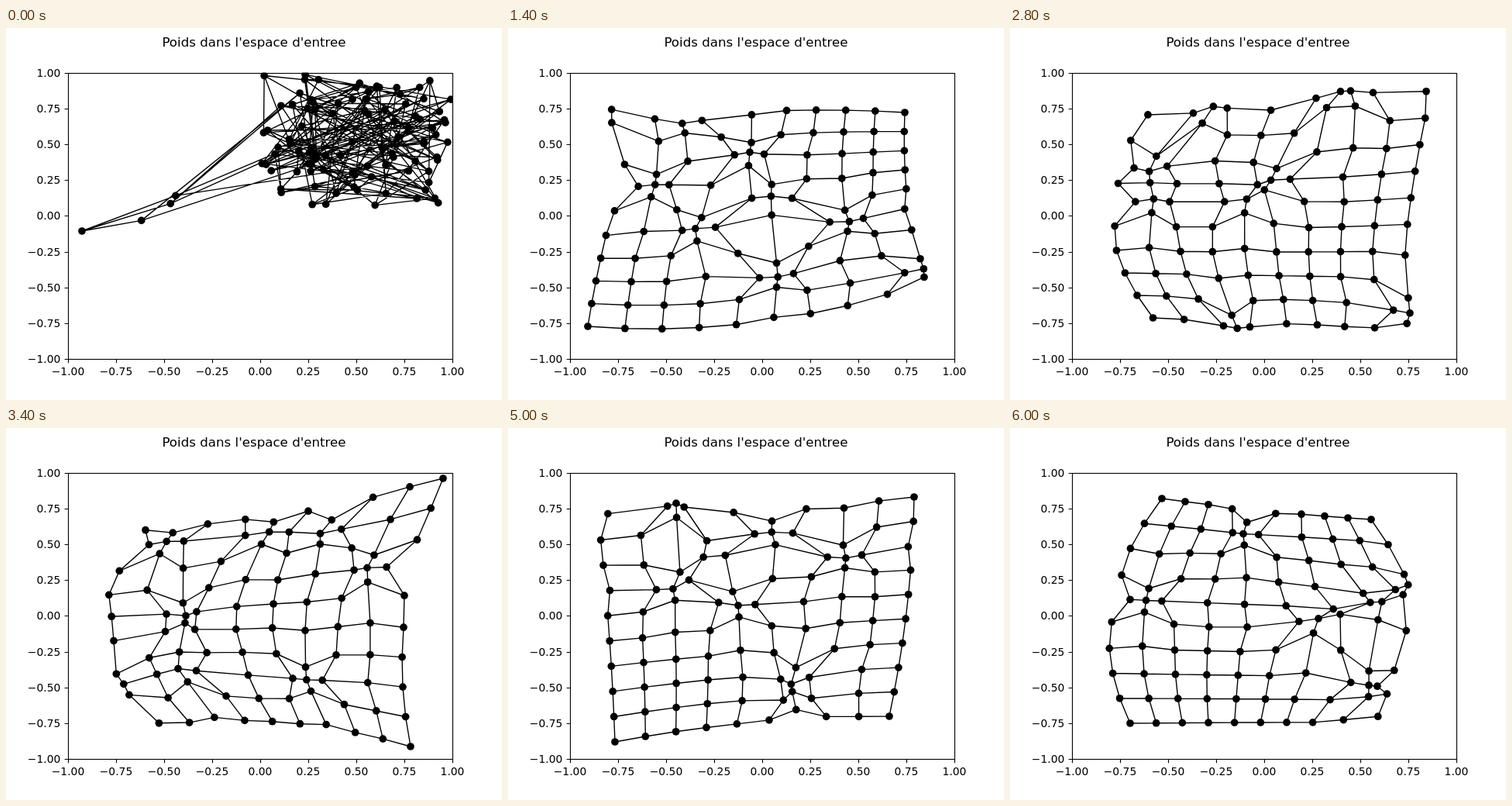
Write an HTML page with a canvas that moves like this. It is 640x480 px and loops after 6.2 s.

```html
<!DOCTYPE html>
<html lang="fr">
<head>
<meta charset="utf-8">
<title>Poids</title>
<style>
html, body { margin: 0; width: 100%; height: 100%; overflow: hidden; background: #fff; }
canvas { display: block; }
</style>
</head>
<body>
<canvas id="stage" width="640" height="480"></canvas>
<script>
const ctx = document.getElementById('stage').getContext('2d');
const N = 10, STEP = 200, STEPS = 31;
const box = { x: 80, y: 57.6, w: 496, h: 369.6 };
const FONT = '"DejaVu Sans", Verdana, sans-serif';

// The middles of the net's sides stay near this frame; its corners wander.
const hull = { left: 130, right: 515, top: 107, bottom: 380 };

// Corners: top left, top right, bottom left, bottom right.
const poses = [
  { t: 1400, corners: [[169, 121], [512, 109], [103, 385], [534, 331]] },
  { t: 2200, corners: [[166, 95], [523, 99], [168, 364], [483, 370]] },
  { t: 3400, corners: [[178, 131], [564, 65], [201, 384], [522, 411]] },
  { t: 4200, corners: [[132, 169], [551, 115], [149, 368], [485, 366]] },
  { t: 5000, corners: [[116, 112], [524, 89], [138, 405], [492, 372]] },
  { t: 6000, corners: [[196, 91], [466, 118], [155, 381], [458, 380]] }
];

function seeded(a) {
  return () => {
    a = a + 0x6D2B79F5 | 0;
    let t = Math.imul(a ^ a >>> 15, 1 | a);
    t = t + Math.imul(t ^ t >>> 7, 61 | t) ^ t;
    return ((t ^ t >>> 14) >>> 0) / 4294967296;
  };
}
const mix = (a, b, k) => a + (b - a) * k;
const mixPoint = (p, q, k) => [mix(p[0], q[0], k), mix(p[1], q[1], k)];
const row = i => Math.floor(i / N), col = i => i % N;
const makeNet = place => Array.from({ length: N * N }, (_, i) => place(i));

// A sheet between four corners whose sides bow towards the hull.
function sheet([tl, tr, bl, br]) {
  const bow = (side, p, q, d) => side - (p[d] + q[d]) / 2;
  const left = bow(hull.left, tl, bl, 0), right = bow(hull.right, tr, br, 0);
  const top = bow(hull.top, tl, tr, 1), bottom = bow(hull.bottom, bl, br, 1);
  return makeNet(i => {
    const u = col(i) / (N - 1), v = row(i) / (N - 1);
    const [x, y] = mixPoint(mixPoint(tl, tr, u), mixPoint(bl, br, u), v);
    return [x + 4 * v * (1 - v) * mix(left, right, u),
            y + 4 * u * (1 - u) * mix(top, bottom, v)];
  });
}

// Learning rule: a winning node and its grid neighbours move towards a sample.
function pull(net, winner, sample, rate) {
  return net.map((p, i) => {
    const d = Math.abs(row(i) - row(winner)) + Math.abs(col(i) - col(winner));
    return mixPoint(p, sample, rate * Math.exp(-0.3 * d ** 3));
  });
}

function nearest(net, [x, y]) {
  const dist = net.map(p => Math.hypot(p[0] - x, p[1] - y));
  return dist.indexOf(Math.min(...dist));
}

function learn(net, seed) {
  const rand = seeded(seed);
  for (let n = 0; n < 9; n++) {
    const sample = [mix(105, 550, rand()), mix(75, 415, rand())];
    net = pull(net, nearest(net, sample), sample, 0.7);
  }
  return net;
}

// Random weights in the upper right quarter, after a first sample far to the left.
function scatter() {
  const rand = seeded(41);
  const net = makeNet(() => [mix(328, 576, rand()), mix(60, 235, rand())]);
  return pull(net, 6 * N, [98, 262], 1);
}

const keys = [{ t: 0, net: scatter() },
  ...poses.map(p => ({ t: p.t, net: sheet(p.corners) }))];

function netAt(t) {
  let i = 0;
  while (i < keys.length - 2 && t >= keys[i + 1].t) i++;
  const a = keys[i], b = keys[i + 1];
  let k = (t - a.t) / (b.t - a.t);
  if (i === 0) k = 1 - (1 - k) ** 2;
  return a.net.map((p, n) => mixPoint(p, b.net[n], k));
}

const nets = Array.from({ length: STEPS }, (_, s) =>
  s ? learn(netAt(s * STEP), s) : netAt(0));

function drawNet(net) {
  ctx.save();
  ctx.beginPath();
  ctx.rect(box.x, box.y, box.w, box.h);
  ctx.clip();
  ctx.lineWidth = 1.39;
  ctx.beginPath();
  const link = (i, j) => {
    ctx.moveTo(...net[i]);
    ctx.lineTo(...net[j]);
  };
  net.forEach((_, i) => {
    if (col(i) < N - 1) link(i, i + 1);
    if (row(i) < N - 1) link(i, i + N);
  });
  ctx.stroke();
  for (const [x, y] of net) {
    ctx.beginPath();
    ctx.arc(x, y, 4.86, 0, 2 * Math.PI);
    ctx.fill();
  }
  ctx.restore();
}

function drawAxes() {
  const snap = v => Math.round(v) + 0.5;
  const x0 = snap(box.x), y0 = snap(box.y);
  const x1 = snap(box.x + box.w), y1 = snap(box.y + box.h);
  ctx.lineWidth = 1.11;
  ctx.strokeRect(x0, y0, x1 - x0, y1 - y0);
  ctx.font = '13.89px ' + FONT;
  ctx.beginPath();
  for (let i = 0; i <= 8; i++) {
    const label = (i / 4 - 1).toFixed(2).replace('-', '\u2212');
    const x = box.x + box.w * i / 8, y = box.y + box.h * (1 - i / 8);
    ctx.moveTo(snap(x), y1);
    ctx.lineTo(snap(x), y1 + 4.86);
    ctx.moveTo(x0, snap(y));
    ctx.lineTo(x0 - 4.86, snap(y));
    ctx.textAlign = 'center';
    ctx.fillText(label, x, 448);
    ctx.textAlign = 'right';
    ctx.fillText(label, 70.3, Math.round(y + 5));
  }
  ctx.stroke();
  ctx.textAlign = 'center';
  ctx.font = '16.67px ' + FONT;
  ctx.fillText("Poids dans l'espace d'entree", 320, 24);
}

const start = performance.now();
function frame() {
  const step = Math.floor((performance.now() - start) / STEP) % STEPS;
  ctx.fillStyle = '#fff';
  ctx.fillRect(0, 0, 640, 480);
  ctx.fillStyle = ctx.strokeStyle = '#000';
  drawNet(nets[step]);
  drawAxes();
  requestAnimationFrame(frame);
}
frame();
</script>
</body>
</html>
```
